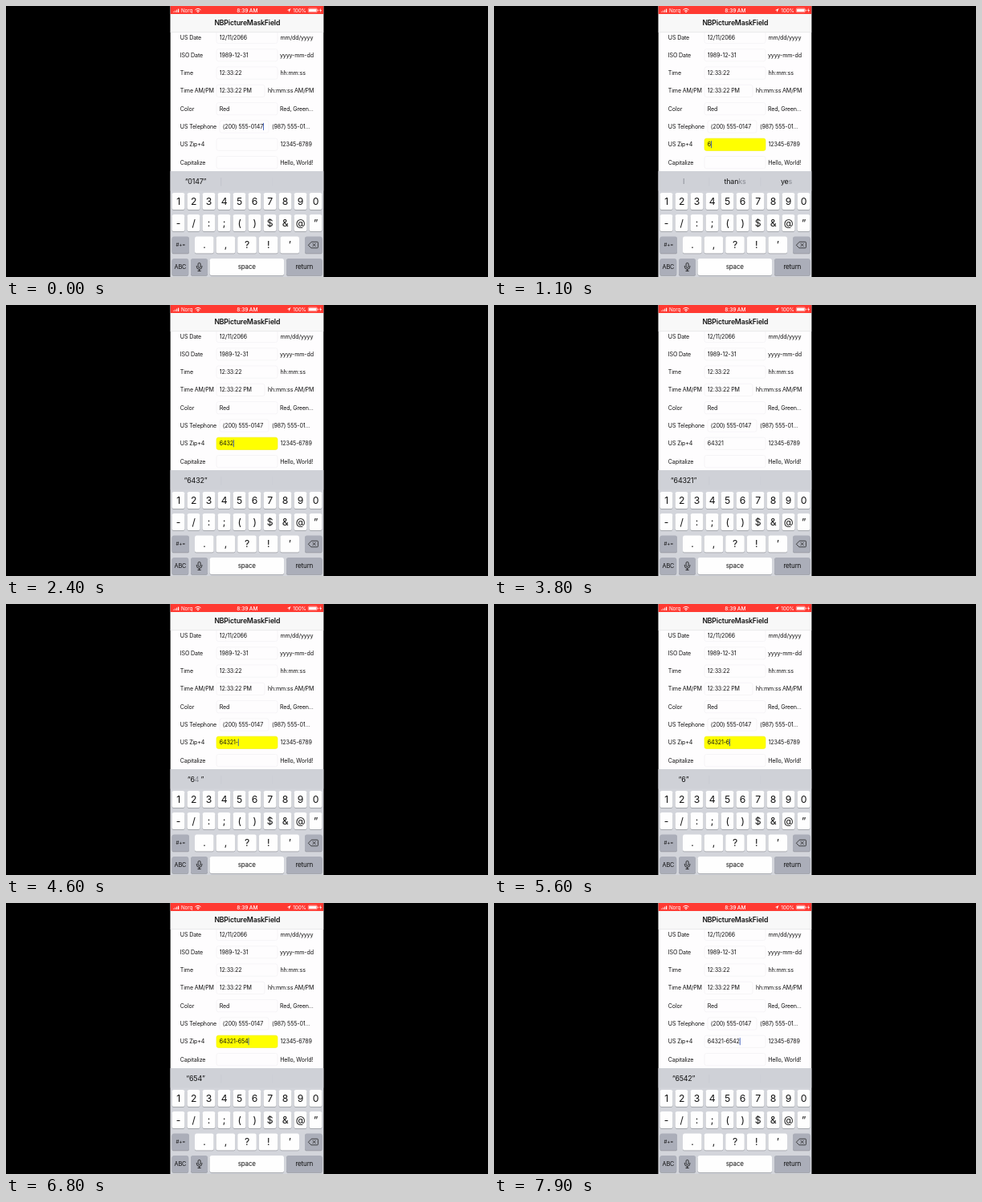
These frames come from a looping animation (600 px wide and 338 px high, 8000 ms). An HTML page:

```html
<!DOCTYPE html>
<html lang="en">
<head>
<meta charset="utf-8">
<title>Masked text field</title>
<style>
  html, body { margin: 0; width: 100%; height: 100%; overflow: hidden; background: #000; }
  svg { display: block; width: 100vw; height: 100vh; }
  text { font-family: Inter, Roboto, sans-serif; letter-spacing: -.02em; white-space: pre; }
</style>
</head>
<body>
<svg id="stage" viewBox="0 0 600 338"></svg>
<script>
const LOOP = 8000;
const stage = document.getElementById('stage');

function add(tag, attrs, parent = stage) {
  const node = document.createElementNS('http://www.w3.org/2000/svg', tag);
  for (const k in attrs) node.setAttribute(k, attrs[k]);
  parent.appendChild(node);
  return node;
}
const box = (x, y, width, height, fill, rx = 0, more = {}) =>
  add('rect', { x, y, width, height, fill, rx, ...more });
const band = (y, height, fill) => box(204.7, y, 190.5, height, fill);
const label = (str, x, y, size, anchor = 'start', more = {}) => {
  const node = add('text', { x, y, 'font-size': size, 'text-anchor': anchor, fill: '#111', ...more });
  node.textContent = str;
  return node;
};
const line = (d, stroke, width, more = {}) =>
  add('path', { d, stroke, 'stroke-width': width, fill: 'none', 'stroke-linecap': 'round', ...more });

box(0, 0, 600, 338, '#000');
band(0, 338, '#fefdfe');

// Form rows: label, value, hint, hint x, field x, field width
const rows = [
  ['US Date', '12/11/2066', 'mm/dd/yyyy', 341.5, 262, 76],
  ['ISO Date', '1989-12-31', 'yyyy-mm-dd', 341, 262, 76],
  ['Time', '12:33:22', 'hh:mm:ss', 341.5, 262, 76],
  ['Time AM/PM', '12:33:22 PM', 'hh:mm:ss AM/PM', 326, 262, 60],
  ['Color', 'Red', 'Red, Green...', 341, 262, 76],
  ['US Telephone', '(200) 555-0147', '(987) 555-01...', 331, 266, 61],
  ['US Zip+4', '', '12345-6789', 341.5, 262, 76],
  ['Capitalize', '', 'Hello, World!', 341.2, 262, 76]
].map(([name, value, hint, hintX, x, w], i) => {
  const y = 39 + i * 22.3;
  const field = box(x, y - 7.6, w, 15.2, '#fefdfe', 2.5, { stroke: '#f0eff1', 'stroke-width': .6 });
  label(name, 216.8, y + 2.5, 7.1);
  label(hint, hintX, y + 2.5, 7.1);
  return { y, field, x: x + 3.8, text: label(value, x + 3.8, y + 2.5, 7.1) };
});
const phone = rows[5], zip = rows[6];
const caret = box(0, 0, .9, 9, '#3557b8');

// Status and navigation bars
band(0, 33, '#f8f8f8');
band(32.6, .5, '#dadadc');
band(0, 10, '#ff3a32');
const white = { fill: '#fff' };
for (let i = 0; i < 4; i++) box(208 + i * 2, 6.6 - i, 1.2, 1.4 + i, '#fff', .3, { opacity: .55 + i * .15 });
label('Norq', 218, 8, 6.3, 'start', white);
line('M235.8 4.6Q239 1.8 242.2 4.6M237.2 6.1Q239 4.5 240.8 6.1', '#fff', 1);
add('circle', { cx: 239, cy: 7.4, r: .8, fill: '#fff' });
label('8:39 AM', 300.3, 8, 6.6, 'middle', { ...white, 'font-weight': 500 });
add('path', { d: 'M354.5 3l-4.7 2.2 2.3.4.3 2.3z', fill: '#fff' });
label('100%', 357.3, 8, 6.4, 'start', white);
box(376.3, 3, 11, 4.8, 'none', 1.1, { stroke: '#fff', 'stroke-width': .5 });
box(377, 3.7, 9.6, 3.4, '#fff', .6);
box(388, 4.6, .8, 1.7, '#fff', .4);
add('path', { d: 'M392 2.6l-2 3.2h1.5l-.6 2.4 2.1-3.3h-1.5z', fill: '#fff' });
label('NBPictureMaskField', 300.3, 24.4, 8.7, 'middle', { 'font-weight': 600 });

// Keyboard
band(206, 132, '#d3d5db');
band(206, 24.5, '#cfd1d7');
const dividers = [267.5, 331.5].map(x => box(x, 214, .6, 10.5, '#b4b8c0'));

function key(x, y, w, str, size, fill = '#fefefe') {
  box(x, y + .8, w, 21, '#96999f', 2.6);
  box(x, y, w, 21, fill, 2.6);
  if (str) label(str, x + w / 2, y + 10.5 + size * .36, size, 'middle');
}
const grey = '#abaeb9';
[...'1234567890'].forEach((c, i) => key(206.6 + i * 19, 233, 15.8, c, 12.2));
[...'-/:;()$&@”'].forEach((c, i) => key(206.6 + i * 19, 260, 15.8, c, 12.2));
key(206.6, 287.5, 21.4, '#+=', 6.2, grey);
[...'.,?!’'].forEach((c, i) => key(235 + i * 26.6, 287.5, 23.6, c, 12.2));
key(372, 287.5, 21.6, '', 0, grey);
key(206.6, 315, 20.6, 'ABC', 7.3, grey);
key(230, 315, 21, '', 0, grey);
key(253.6, 315, 92.4, 'space', 8);
key(349, 315, 44.6, 'return', 8, grey);
line('M376.6 298l3.6-3.8h7.2q1 0 1 1v5.6q0 1-1 1h-7.2zM381.9 296.3l3.4 3.4M385.3 296.3l-3.4 3.4',
  '#222', .8, { 'stroke-linejoin': 'round' });
box(239.1, 320.4, 3, 6, 'none', 1.5, { stroke: '#111', 'stroke-width': .8 });
line('M237.3 324.3v.8a3.3 3.3 0 0 0 6.6 0v-.8M240.6 328.4v2M238.9 330.5h3.4', '#111', .8);

// Each suggestion is [solid, faded, solid] text
const slots = [236, 300, 364].map(x => {
  const text = label('', x, 222.3, 8.9, 'middle');
  return ['#111', '#83868e', '#111'].map(fill => add('tspan', { fill }, text));
});
const quoted = s => [['“' + s + '”']];

// Steps: time, zip text (null while the phone field has focus), suggestions
const steps = [
  [0, null, quoted('0147')],
  [500, '', [['I'], ['thanks'], ['yes']]],
  [1000, '6', [['', 'I'], ['than', 'ks'], ['ye', 's']]],
  [1200, '6', quoted('6')],
  [1500, '64', quoted('64')],
  [1900, '643', quoted('643')],
  [2300, '6432', quoted('6432')],
  [2900, '64321', quoted('64321')],
  [4500, '64321-', [['“6', '4', ' ”']]],
  [4700, '64321-', []],
  [5300, '64321-6', quoted('6')],
  [6000, '64321-65', quoted('65')],
  [6700, '64321-654', quoted('654')],
  [7500, '64321-6542', quoted('6542')]
];

function draw(t) {
  const index = steps.findLastIndex(s => s[0] <= t);
  const [start, value, words] = steps[index];
  const row = value === null ? phone : zip;
  zip.text.textContent = value || '';
  const partial = value && ![5, 10].includes(value.length);
  zip.field.setAttribute('fill', partial ? '#ffff00' : '#fefdfe');
  zip.field.setAttribute('stroke', partial ? '#f0f000' : '#f0eff1');

  const length = row.text.textContent ? row.text.getComputedTextLength() : 0;
  caret.setAttribute('x', row.x + length);
  caret.setAttribute('y', row.y - 4.6);
  caret.setAttribute('visibility', (t - start) % 1000 < 500 ? 'visible' : 'hidden');

  slots.forEach((spans, i) => spans.forEach((span, j) => {
    span.textContent = (words[i] || [])[j] || '';
  }));
  dividers[0].setAttribute('opacity', index === 0 ? .8 : .3);
  dividers[1].setAttribute('opacity', words.length > 1 ? .3 : .1);
}

function tick() {
  draw(performance.now() % LOOP);
  requestAnimationFrame(tick);
}
tick();
</script>
</body>
</html>
```
